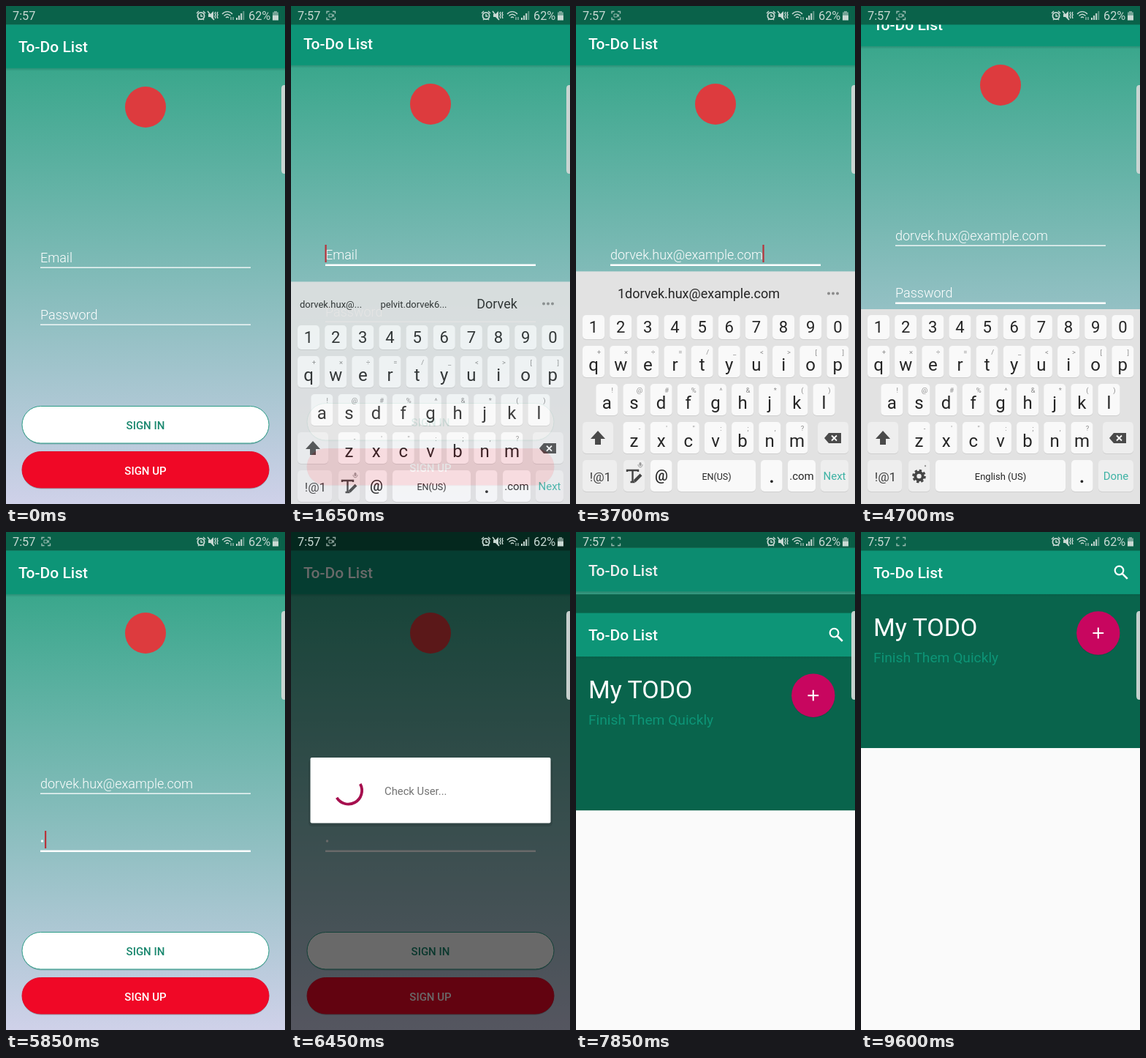
Animation of 382 by 680 pixels, one loop 10 s. Source, as an HTML page:

```html
<!DOCTYPE html>
<html lang="en">
<head>
<meta charset="utf-8">
<title>To-Do List</title>
<style>
  html, body { margin: 0; width: 100%; height: 100%; overflow: hidden; }
  svg { display: block; width: 100%; height: 100%; font-family: Roboto, sans-serif; }
  text { white-space: pre; }
</style>
</head>
<body>
<svg id="stage" viewBox="0 0 382 680"></svg>
<script>
const LOOP = 10000;
const MAIL = 'dorvek.hux@example.com';
const WHITE = '#fff', DARK = '#0a624a', GREEN = '#0d9577', INK = '#252525';
const STATUS = 25.46, BAR_END = 84.9;

const text = (x, y, size, fill, str, extra = '') =>
  `<text x="${x}" y="${y}" font-size="${size}" fill="${fill}" ${extra}>${str.replace(/&/g, '&amp;').replace(/</g, '&lt;')}</text>`;
const mid = (x, y, size, fill, str, extra = '') =>
  text(x, y, size, fill, str, 'text-anchor="middle" ' + extra);
const rect = (x, y, w, h, fill, extra = '') =>
  `<rect x="${x}" y="${y}" width="${w}" height="${h}" fill="${fill}" ${extra}/>`;
const path = (d, extra) => `<path d="${d}" fill="none" ${extra}/>`;
const group = (id, body) => `<g id="${id}">${body}</g>`;

const appBar = () =>
  rect(0, BAR_END, 382, 4, 'url(#shade)') +
  rect(0, STATUS, 382, BAR_END - STATUS, GREEN) +
  text(17, 63.2, 21, WHITE, 'To-Do List', 'font-weight="500"');

function login() {
  const field = (id, y, hint) =>
    text(47, y, 18, WHITE, hint, `id="${id}" font-weight="300"`) +
    rect(47, y + 6.5, 288, 1.3, WHITE, `id="${id}Line"`);
  const button = (y, h, fill, stroke, color, label) =>
    rect(22, y + 1.5, 338, h, '#2d6c68', 'rx="25.5" opacity=".3"') +
    rect(22, y, 338, h, fill, `rx="25.5" stroke="${stroke}"`) +
    mid(191, y + 31.3, 15, color, label, 'font-weight="500"');
  return group('page',
      rect(0, 25, 382, 690, 'url(#sky)') + appBar() +
      '<circle cx="191" cy="138" r="28" fill="#dd3b3e"/>' +
      field('email', 350, 'Email') + field('pass', 428, 'Password') +
      '<circle id="dot" cx="49.5" cy="422" r="1.7" fill="#fff"/>' +
      rect(46.5, 330, 2.2, 24, '#b8333b', 'id="caret"') +
      button(546.5, 50.5, WHITE, '#2b9c86', '#19876e', 'SIGN IN') +
      button(608.5, 49.5, '#f00826', '#e00c2b', WHITE, 'SIGN UP')) +
    rect(0, 0, 382, STATUS, DARK);
}

function keyboard() {
  const key = (x, y, w, h, fill = '#f9f9f9') =>
    rect(x, y + 1, w, h, '#cfcfcf', 'rx="5"') + rect(x, y, w, h, fill, 'rx="5"');
  const special = (x, y, w, h) => key(x, y, w, h, '#eeeeee');
  const row = (chars, marks, x0, y) => [...chars].map((c, i) => {
    const x = x0 + i * 37.15;
    return key(x - 15, y, 30, 43) + mid(x, y + 33.5, 24, INK, c) +
      mid(x + 7.5, y + 12, 9.5, '#8c8c8c', marks[i]);
  }).join('');
  const digits = [...'1234567890'].map((c, i) => {
    const x = 24 + i * 37.15;
    return key(x - 15, 422, 30, 33) + mid(x, 446, 22, INK, c);
  }).join('');
  const shared = digits +
    row('qwertyuiop', '+×÷=/_<>[]', 24, 464) +
    row('asdfghjkl', '!@#%^&*()', 42.3, 516) +
    row('zxcvbnm', '-\'":;,?', 79.5, 568) +
    special(9, 568, 42, 43) +
    '<path d="M30 580l10 11h-6v8h-8v-8h-6z" fill="#4a4a4a"/>' +
    special(331, 568, 42, 43) +
    '<path d="M340 590l6-7h17v14h-17z" fill="#4a4a4a"/>' +
    path('M350 586.5l7 7m0-7l-7 7', 'stroke="#fff" stroke-width="1.8"') +
    special(9, 620, 47, 43) + mid(33.5, 648.5, 17.2, '#3c3c3c', '!@1') +
    special(65, 620, 29.5, 43);
  const mailRow =
    path('M70 636v-2h15v2M77.5 634v16m-3 0h6', 'stroke="#444" stroke-width="2.4"') +
    path('M80 649l9-9', 'stroke="#444" stroke-width="4"') +
    rect(86.5, 623, 3, 5, '#9a9a9a', 'rx="1.5"') +
    path('M85 626c0 5 6 5 6 0', 'stroke="#9a9a9a"') +
    key(102, 620, 29.5, 43) + mid(117, 648, 20, INK, '@', 'font-weight="500"') +
    key(139, 620, 107, 43) + mid(192.5, 646.5, 12.5, INK, 'EN(US)') +
    key(253, 620, 29.5, 43) + mid(268, 651, 24, INK, '.', 'font-weight="700"') +
    key(290, 620, 38, 43) + mid(309, 647, 15, INK, '.com') +
    special(335, 620, 38, 43) + mid(354, 647, 15, '#3fb3a5', 'Next');
  const passRow =
    '<circle cx="79.5" cy="642" r="5.2" fill="none" stroke="#444" stroke-width="4"/>' +
    '<circle cx="79.5" cy="642" r="8" fill="none" stroke="#444" stroke-width="2.6" stroke-dasharray="3.4 2.88"/>' +
    '<circle cx="88" cy="628" r="1.2" fill="#9a9a9a"/>' +
    key(102, 620, 178, 43) + mid(191, 646.5, 13, INK, 'English (US)') +
    key(288, 620, 29.5, 43) + mid(302.5, 651, 24, INK, '.', 'font-weight="700"') +
    special(325, 620, 48, 43) + mid(349, 647, 15, '#3fb3a5', 'Done');
  const dots = [346, 352, 358].map(x => `<circle cx="${x}" cy="392.5" r="2" fill="#8b8b8b"/>`).join('');
  return rect(0, 414, 382, 266, '#e2e2e2') + shared +
    group('mailKeys', rect(0, 362.4, 382, 52, '#e2e2e2') + dots + mailRow) +
    group('hints',
      mid(54.5, 397.5, 13, INK, 'dorvek.hux@...') +
      mid(168, 397.5, 13, INK, 'pelvit.dorvek6...') +
      mid(282, 399, 18, INK, 'Dorvek')) +
    group('match', mid(168, 399, 18, INK, '1' + MAIL)) +
    group('passKeys', passRow);
}

const dialog = () =>
  rect(24, 310, 334, 92, '#000', 'rx="5" opacity=".12"') +
  rect(26.5, 308, 329, 89.5, WHITE, 'rx="2"') +
  '<circle id="spin" cx="78.5" cy="353" r="18.6" fill="none" stroke="#a60f4e" stroke-width="3.8"/>' +
  text(128, 358.5, 14.8, '#737373', 'Check User...');

const home = () =>
  rect(0, 0, 382, 690, '#fafafa') + rect(0, 0, 382, 295, '#09644c') +
  rect(0, 0, 382, STATUS, DARK) + appBar() +
  '<circle cx="353.5" cy="52.5" r="5.8" fill="none" stroke="#fff" stroke-width="2.2"/>' +
  path('M357.8 56.8l7 7', 'stroke="#fff" stroke-width="2.6"') +
  text(17, 142, 34, WHITE, 'My TODO') +
  text(17, 178, 19.2, GREEN, 'Finish Them Quickly') +
  '<circle cx="324.8" cy="139" r="29.7" fill="#000" opacity=".12"/>' +
  '<circle cx="324.8" cy="138" r="29.7" fill="#c8065f"/>' +
  path('M317.4 138h14.8M324.8 130.6v14.8', 'stroke="#fff" stroke-width="2.1"');

function statusIcons() {
  const tint = '#c8d9d3';
  const line = `stroke="${tint}" stroke-width="1.4"`;
  const bars = [0, 1, 2, 3].map(i =>
    rect(315 + i * 3.1, 16 - i * 3, 2, 3 + i * 3, tint, i > 2 ? 'opacity=".45"' : '')).join('');
  return text(9, 19, 16.3, tint, '7:57') +
    `<g id="capture" opacity=".75">` +
      path('M49 10.5v-3h3.5M57 7.5h3.5v3M60.5 15.5v3H57M52.5 18.5H49v-3', line) +
      group('cam', path('M52 11h4.5v4H52zM56.5 13l2-1.5v3z', `stroke="${tint}"`)) + '</g>' +
    `<circle cx="267" cy="13.5" r="4.6" fill="none" stroke="${tint}" stroke-width="1.8"/>` +
    path('M267 11v3h2.5M261 10l3-3M273 10l-3-3M263 19l1.5-1.5M271 19l-1.5-1.5', line) +
    `<path d="M277 11h3l4-4v12l-4-4h-3z" fill="${tint}"/>` +
    path('M276 7l9 12M287 8l-1 2 1 2-1 2 1 3M290 8l-1 2 1 2-1 2 1 3', line) +
    path('M296 11c4-4.5 10-4.5 14 0M298.5 13.5c3-3 6-3 9 0M301 16c1.5-1.5 2.5-1.5 4 0', line) +
    path('M308 15v4M311 15v4', `stroke="${tint}"`) +
    bars + text(332, 19, 16.3, tint, '62%') +
    rect(367, 7, 4, 2, tint, 'opacity=".55"') +
    rect(365, 8.5, 8, 4, tint, 'opacity=".55"') + rect(365, 12.5, 8, 7, tint);
}

const stage = document.getElementById('stage');
stage.innerHTML =
  `<defs>
    <linearGradient id="sky" gradientUnits="userSpaceOnUse" x1="0" y1="85" x2="0" y2="680">
      <stop stop-color="#3aa78c"/><stop offset="1" stop-color="#cfd1e9"/>
    </linearGradient>
    <linearGradient id="shade" x2="0" y2="1">
      <stop stop-color="#064a3a" stop-opacity=".25"/><stop offset="1" stop-color="#064a3a" stop-opacity="0"/>
    </linearGradient>
  </defs>` +
  group('login', login()) + group('keys', keyboard()) +
  rect(0, 0, 382, 680, '#000', 'id="dim"') + group('dialog', dialog()) +
  group('home', home()) + statusIcons() +
  '<path d="M383 108h-2q-4 0-4 5v111q0 5 4 5h2z" fill="#d0d7d5" opacity=".95"/>';

const ui = {};
stage.querySelectorAll('[id]').forEach(el => ui[el.id] = el);

const span = (t, a, b) => Math.min(1, Math.max(0, (t - a) / (b - a)));
const smooth = p => p * p * (3 - 2 * p);
const within = (t, ranges) => ranges.some(([a, b]) => t >= a && t < b);
const set = (el, attrs) => { for (const k in attrs) el.setAttribute(k, attrs[k]); };
const show = (el, on) => set(el, { display: on ? 'inline' : 'none' });
const move = (el, y) => set(el, { transform: `translate(0 ${y.toFixed(2)})` });

// y of the curve (0,0) (x1,0) (x2,1) (x3,1) at x
function bezier(x1, x2, x3, x) {
  if (x <= 0) return 0;
  if (x >= x3) return 1;
  let lo = 0, hi = 1, u;
  for (let i = 0; i < 20; i++) {
    u = (lo + hi) / 2;
    const v = 1 - u;
    if (3 * v * v * u * x1 + 3 * v * u * u * x2 + u * u * u * x3 < x) lo = u; else hi = u;
  }
  return u * u * (3 - 2 * u);
}

function drawSpinner(t) {
  const p = (t % 1333) / 1333;
  const head = 0.75 * bezier(0.2, 0.1, 0.5, p) + 0.03;
  const tail = 0.75 * bezier(0.2, 0.1, 0.5, p - 0.5);
  const len = 2 * Math.PI * 18.6;
  const turn = -90 + 360 * (tail + p * 0.25) + t / 4444 * 720;
  set(ui.spin, {
    'stroke-dasharray': `${len * (head - tail)} ${len}`,
    transform: `rotate(${turn} 78.5 353)`
  });
}

const CARET = [[400, 750], [1250, 2050], [2300, 3100], [3700, 4000],
  [4150, 4600], [5000, 5600], [5850, 6000]];

function draw(t) {
  const filled = t >= 2300, onPass = t >= 4050, typed = t >= 4950;

  // login form
  const up = smooth(span(t, 1400, 1650)), next = smooth(span(t, 4050, 4450));
  const back = smooth(span(t, 4980, 5400));
  move(ui.page, (-4 * up - 26 * next) * (1 - back));
  ui.email.textContent = filled ? MAIL : 'Email';
  show(ui.pass, !typed);
  show(ui.dot, typed);
  set(ui.emailLine, { height: t >= 400 && !onPass ? 2.5 : 1.3 });
  set(ui.passLine, { height: onPass ? 2.5 : 1.3 });
  show(ui.caret, within(t, CARET));
  set(ui.caret, {
    x: onPass ? (typed ? 53 : 46.5) : filled ? 46.5 + ui.email.getComputedTextLength() : 46.5,
    y: onPass ? 408 : 330
  });

  // keyboard
  const rise = span(t, 1380, 1800), fall = span(t, 4930, 5450);
  const layout = t >= 4150;
  show(ui.keys, rise > 0 && fall < 1);
  move(ui.keys, 60 * (1 - rise) ** 1.4 + 90 * fall ** 1.4);
  set(ui.keys, { opacity: Math.min(1, rise * 1.37) * (1 - fall) });
  show(ui.mailKeys, !layout);
  show(ui.passKeys, layout);
  show(ui.hints, !filled);
  show(ui.match, filled && !layout);

  // progress dialog
  const fade = smooth(span(t, 6180, 6400)) * (1 - smooth(span(t, 7220, 7460)));
  const enter = 1 - (1 - span(t, 7630, 8100)) ** 3.27;
  set(ui.dim, { opacity: 0.59 * fade + 0.07 * enter });
  set(ui.dialog, { opacity: fade });
  drawSpinner(Math.max(0, t - 6185));

  // task screen
  move(ui.login, -4.2 * enter);
  show(ui.home, enter > 0);
  move(ui.home, 680 * (1 - enter));

  show(ui.capture, t >= 50);
  show(ui.cam, t < 7650);
}

const begin = performance.now();
function tick() {
  draw((performance.now() - begin) % LOOP);
  requestAnimationFrame(tick);
}
tick();
</script>
</body>
</html>
```
